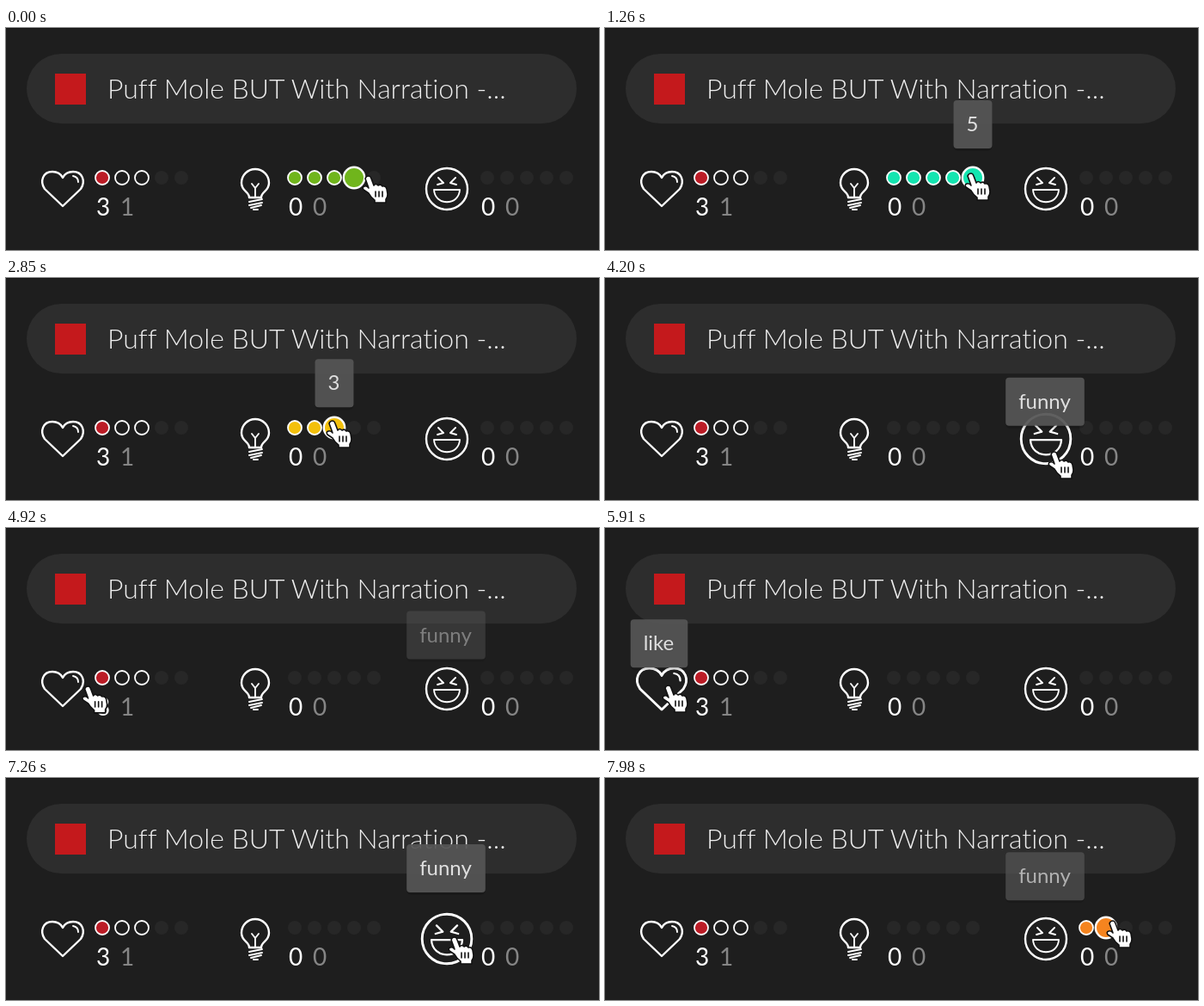
These frames come from a looping animation (690 by 258 pixels, 8 s). An HTML page:

```html
<!DOCTYPE html>
<html lang="en">
<head>
<meta charset="utf-8">
<title>Rating bar</title>
<style>
  html, body { margin: 0; width: 100%; height: 100%; overflow: hidden; background: #1e1e1e; }
  svg { display: block; width: 690px; height: 258px; font-family: Lato, "Open Sans", sans-serif; font-variant-ligatures: none; }
  .line { fill: none; stroke: #fff; stroke-width: 2.4; stroke-linecap: round; stroke-linejoin: round; }
  .thin { stroke-width: 1.9; }
  .title { font-size: 32px; font-weight: 300; fill: #eee; }
  .count { font-size: 28px; fill: #fff; }
  .total { fill: #858585; }
  .tip text { font-size: 24px; fill: #eee; text-anchor: middle; }
</style>
</head>
<body>
<svg viewBox="0 0 690 258">
  <rect width="690" height="258" fill="#1e1e1e"/>
  <rect width="690" height="1" fill="#141414"/>
  <rect x="24" y="30" width="640" height="81" rx="40.5" fill="#2d2d2d"/>
  <rect x="57" y="53" width="36" height="36" fill="#c4191c"/>
  <text class="title" x="118" y="82">Puff Mole BUT With Narration -...</text>

  <g id="heart" class="line">
    <path d="M66 207L45 187C39 178 43 167 54 167C60 167 64 170 66 174C68 170 72 167 78 167C89 167 93 178 87 187Z"/>
    <path class="thin" d="M78 172Q84 173 84 179"/>
  </g>
  <g class="line">
    <path d="M283 197C283 190 274 190 274 180A16 16 0 0 1 306 180C306 190 297 190 297 197Z"/>
    <path class="thin" d="M286 181L290 186L294 181M290 186V196"/>
    <path class="thin" d="M283 202L298 199M283 206L298 203M285 209L297 206M288 211H293"/>
  </g>
  <g id="smile" class="line">
    <circle cx="513" cy="187" r="24"/>
    <path class="thin" d="M503 174L509 180L502 182M523 174L517 180L524 182"/>
    <path class="thin" d="M498 188H528C527 207 499 207 498 188Z"/>
  </g>

  <g id="dots"></g>
  <g id="counts"></g>
  <g id="tips"></g>

  <g id="hand" stroke="#111" stroke-width="1.6" stroke-linejoin="round" stroke-linecap="round">
    <path fill="#fff" d="M-4 2Q-3 -1 0 -1Q2 -1 3 2L6 10Q8 7 11 10Q14 8 16 11Q20 10 21 14L22 20Q22 24 20 26V30H7V27Q2 23 0 19L-6 15Q-8 12 -5 11Q-2 10 0 13Z"/>
    <path fill="none" d="M8 17V23M12 17V23M16 17V23"/>
  </g>
  <path id="arrow" d="M1 1V31L8 25L13 35L18 33L13 23H22Z" fill="#0c0c0c" stroke="#fff" stroke-width="2" stroke-linejoin="round"/>
</svg>
<script>
const LOOP = 8000;
const LAG = 30, BLEND = 90;      // hover response, ms
const SLIDE = 39, FADE = 205;    // tooltip travel and time
const GAP = 23, DOT_Y = 174;
const COLORS = ["#bb1c26", "#f5841f", "#f3c00c", "#70b51c", "#14e5b0"];
const groupX = g => 112 + 224 * g;
const dotX = (g, i) => groupX(g) + GAP * i;
const $ = id => document.getElementById(id);

function set(el, attrs) {
  for (const k in attrs) el.setAttribute(k, attrs[k]);
}
function make(parent, tag, attrs, text = "") {
  const el = document.createElementNS("http://www.w3.org/2000/svg", tag);
  set(el, attrs);
  el.textContent = text;
  parent.append(el);
  return el;
}
const ramp = (t, start, length) => Math.max(0, Math.min(1, (t - start) / length));
const smooth = k => k * k * (3 - 2 * k);

// Pointer moves: start, end, x, y
const START = [404, 173];
const MOVES = [
  [-100, 60, 430, 173], [700, 1200, 426, 170], [1750, 2050, 404, 169], [2400, 2700, 380, 167],
  [3280, 3650, 523, 203], [4640, 4964, 74, 184], [6180, 6330, 382, 182], [6330, 6720, 535, 203],
  [6760, 6960, 522, 186], [7620, 7860, 591, 167]
];
function pointer(t) {
  let [x, y] = START;
  for (const [start, end, toX, toY] of MOVES) {
    const k = smooth(ramp(t, start, end - start));
    x += (toX - x) * k;
    y += (toY - y) * k;
  }
  return [x, y];
}

const ICONS = [{ el: $("heart"), x: 66, y: 187 }, { el: $("smile"), x: 513, y: 187 }];

// What lies under the pointer: an icon, or a group and its rating
function hit(t) {
  const [x, y] = pointer(t);
  const icon = ICONS.find(c => Math.hypot(x - c.x, y - c.y) < 31);
  if (icon) return { icon };
  for (const group of [1, 2]) {
    const rating = Math.round((x - groupX(group)) / GAP) + 1;
    if (Math.abs(y - DOT_Y) < 10.5 && rating > 0 && rating < 6) return { group, rating };
  }
  return null;
}

const dots = [0, 1, 2].map(g => COLORS.map((_, i) => {
  const at = { cx: dotX(g, i), cy: DOT_Y, r: 8 };
  make($("dots"), "circle", { ...at, fill: "#272727" });
  const rated = g === 0 && i < 3;
  return make($("dots"), "circle", {
    ...at, stroke: "#fff", "stroke-width": 1.8,
    fill: i ? "#1e1e1e" : COLORS[0], opacity: rated ? 1 : 0
  });
}));

["31", "00", "00"].forEach(([mine, all], g) => {
  make($("counts"), "text", { class: "count", x: groupX(g) - 7, y: 218 }, mine);
  make($("counts"), "text", { class: "count total", x: groupX(g) + 21, y: 218 }, all);
});

// Tooltips: label, centre, top, show, hide
const TIPS = [
  [5, dotX(1, 4), 84, 480, 1900], [4, dotX(1, 3), 84, 2080, 2440], [3, dotX(1, 2), 84, 2700, 3400],
  ["funny", 512, 77, 4200, 4818], ["like", 63, 77, 5860, 6372], ["funny", 512, 77, 6740, 7932]
].map(([label, x, top, show, hide]) => {
  const el = make($("tips"), "g", { class: "tip" });
  const shade = make(el, "rect", { y: 2, height: 57, rx: 5, opacity: 0.16 });
  const box = make(el, "rect", { height: 56, rx: 4, fill: "#555" });
  const width = make(el, "text", { x: x - 0.5, y: 36 }, label).getComputedTextLength() + 31;
  for (const r of [shade, box]) set(r, { x: x - width / 2, width });
  return { el, top, show, hide };
});

function draw(t) {
  // Averaging the recent hits eases every hover change
  const recent = Array.from({ length: 10 }, (_, k) => hit(t - LAG - BLEND * k / 9));
  const share = test => smooth(recent.filter(h => h && test(h)).length / recent.length);

  for (const group of [1, 2]) {
    const last = recent.find(h => h && h.group === group);
    const stay = recent[0] === last ? 1 : share(h => h.group === group);
    dots[group].forEach((el, i) => {
      const on = last && i < last.rating;
      const grow = share(h => h.group === group && h.rating === i + 1);
      set(el, {
        r: 8 + 4.2 * grow,
        "stroke-width": 1.8 + 0.6 * grow,
        fill: on ? COLORS[last.rating - 1] : "none",
        opacity: on ? stay : 0
      });
    });
  }
  for (const c of ICONS) {
    const s = 1 + 0.2 * share(h => h.icon === c);
    set(c.el, { transform: `translate(${c.x} ${c.y}) scale(${s}) translate(${-c.x} ${-c.y})` });
  }
  for (const { el, top, show, hide } of TIPS) {
    const out = ramp(t, hide, FADE);
    const y = top + SLIDE * (1 - ramp(t, show, FADE) + out);
    set(el, { transform: `translate(0 ${y})`, opacity: t < show ? 0 : 0.93 * (1 - out) });
  }
  const transform = `translate(${pointer(t)})`;
  const active = hit(t);
  set($("hand"), { transform, visibility: active ? "visible" : "hidden" });
  set($("arrow"), { transform, visibility: active ? "hidden" : "visible" });
}

const begin = performance.now();
function tick() {
  draw((performance.now() - begin) % LOOP);
  requestAnimationFrame(tick);
}
tick();
</script>
</body>
</html>
```
